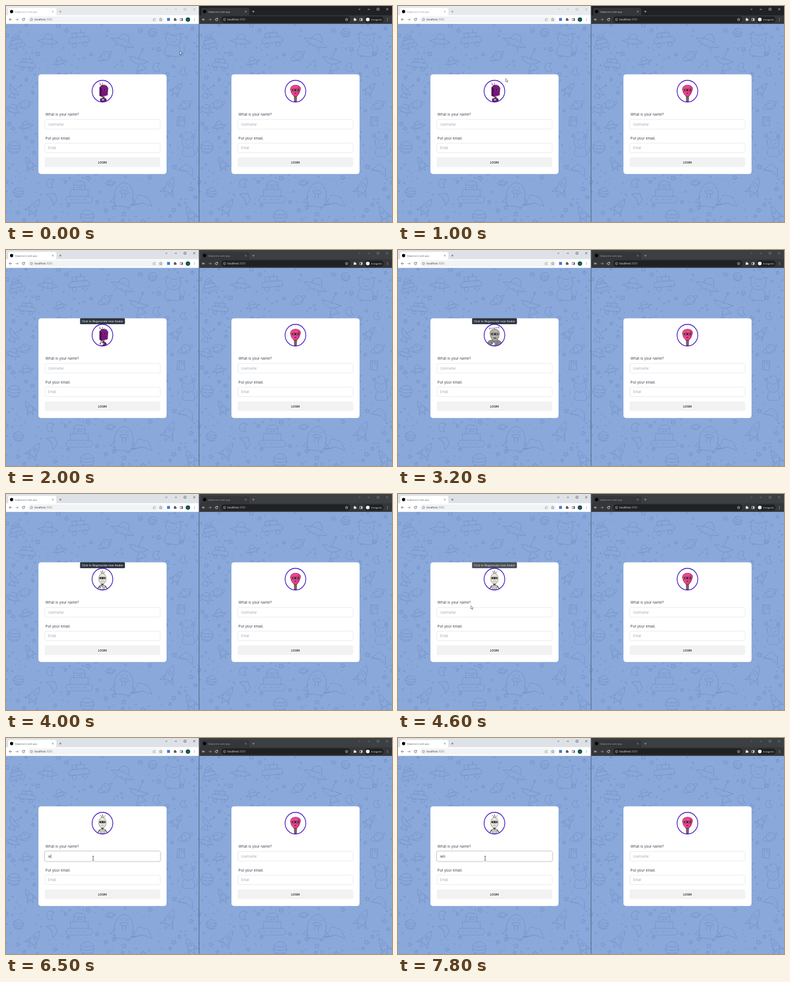
Animation of 690 by 388 pixels, one loop 8 s. Source, as an HTML page with a canvas:

```html
<!DOCTYPE html>
<html lang="en">
<head>
<meta charset="utf-8">
<title>Login</title>
<style>
html, body { margin: 0; width: 100%; height: 100%; overflow: hidden; background: #8aa9da; }
canvas { display: block; width: 690px; height: 388px; }
</style>
</head>
<body>
<canvas id="stage"></canvas>
<script>
const W = 690, H = 388, HALF = 345, LOOP = 8000;
const UI = '"Open Sans", "Noto Sans", sans-serif';
const PAGE = 'Inter, Roboto, sans-serif';
const APP = 'Gabplume web app';
const ratio = Math.max(1, window.devicePixelRatio || 1);

function makeCanvas(canvas, w, h) {
  canvas.width = w * ratio;
  canvas.height = h * ratio;
  const ctx = canvas.getContext('2d');
  ctx.scale(ratio, ratio);
  return ctx;
}
const c = makeCanvas(document.getElementById('stage'), W, H);

const clamp = v => Math.max(0, Math.min(1, v));
const ramp = (t, a, b) => clamp((t - a) / (b - a));
const ease = v => v * v * (3 - 2 * v);

function rect(x, y, w, h, r, fill, stroke, line = .5) {
  c.beginPath();
  c.roundRect(x, y, w, h, r);
  if (fill) { c.fillStyle = fill; c.fill(); }
  if (stroke) { c.strokeStyle = stroke; c.lineWidth = line; c.stroke(); }
}
function oval(x, y, rx, ry, fill, stroke, line = .5) {
  c.beginPath();
  c.ellipse(x, y, rx, ry, 0, 0, 7);
  if (fill) { c.fillStyle = fill; c.fill(); }
  if (stroke) { c.strokeStyle = stroke; c.lineWidth = line; c.stroke(); }
}
function shape(d, x, y, fill, stroke, line = .8) {
  c.save();
  c.translate(x, y);
  const p = new Path2D(d);
  if (fill) { c.fillStyle = fill; c.fill(p); }
  if (stroke) { c.strokeStyle = stroke; c.lineWidth = line; c.stroke(p); }
  c.restore();
}
function text(s, x, y, size, color, family = PAGE, weight = 400, align = 'left') {
  c.font = `${weight} ${size}px ${family}`;
  c.textAlign = align;
  c.fillStyle = color;
  c.fillText(s, x, y);
  return c.measureText(s).width;
}
function faded(alpha, fn) {
  c.save();
  c.globalAlpha = alpha;
  fn();
  c.restore();
}

// Wallpaper

const doodles = {
  ufo: 'M-18 2Q0-8 18 2Q0 12-18 2ZM-8-2Q-7-12 0-12Q7-12 8-2M-10 3h2M-1 5h2M8 3h2M-7 7l-3 6M7 7l3 6',
  saturn: 'M-9 0a9 9 0 1 0 18 0a9 9 0 1 0-18 0M-8-4C-24 4-14 10 0 5S22-9 8-5M-3-4h4',
  ball: 'M-11 0a11 11 0 1 0 22 0a11 11 0 1 0-22 0M-10-4Q0-1 10-4M-11 1Q0 5 11 1M-8 7Q0 10 8 7',
  rocket: 'M0-18Q8-8 6 8H-6Q-8-8 0-18ZM-6 1L-12 12L-5 9M6 1L12 12L5 9M-3-4a3 3 0 1 0 6 0a3 3 0 1 0-6 0M-3 9L0 17L3 9',
  cat: 'M-16-10L-14-22L-6-16H4L12-22L14-10Q16 4 0 5Q-16 4-16-10ZM-8-8h2M5-8h2M-3-3Q0 0 3-3M-12 4Q-20 24-10 26H12Q20 22 12 4M15 22Q28 16 22 4',
  dish: 'M-16-8Q-14 14 10 10ZM-4 2L8-12M8-14a2 2 0 1 0 .1 0M-6 10L-12 20H4L-1 11',
  rover: 'M-18 6H18V0Q18-4 12-4H-12Q-18-4-18 0ZM-12-4V-12H10V-4M-4-12V-4M4-12V-18M-14 10a4 4 0 1 0 8 0a4 4 0 1 0-8 0M5 10a4 4 0 1 0 8 0a4 4 0 1 0-8 0',
  tank: 'M-24 16a6 6 0 0 0 6 6H18a6 6 0 0 0 0-12H-18a6 6 0 0 0-6 6ZM-16 10V-2H16V10M-10-2V-14Q0-22 10-14V-2M-10-10H10M-16 16h4M-4 16h4M8 16h4M-5-6h10',
  walrus: 'M-14 24Q-22 0-10-14Q0-24 10-14Q22 0 14 24ZM-6-9h2M4-9h2M-8-2Q0-8 8-2Q4 4 0 0Q-4 4-8-2M-3 2V10M3 2V10M-15 8L-24 18L-13 20M15 8L24 18L13 20',
  book: 'M-8-10L8-12L10 8L-6 10ZM-4-11L-2 9M1-7l5-1M2-3l5-1',
  lines: 'M-18 8L-7-11L10-6L17 10L0 4ZM-18 8L0 4',
  moon: 'M4-9A10 10 0 1 0 9 6A9 9 0 0 1 4-9Z',
  star: 'M0-5L1.5-1.6 5-1.5 2.3.9 3.2 4.5 0 2.5-3.2 4.5-2.3.9-5-1.5-1.5-1.6Z'
};
// x, y, scale, turn
const places = {
  rover: [[131, 60, 1, -.1], [38, 105, .8, .1]],
  ufo: [[75, 62, 1, .1], [209, 64, 1.2, .4], [96, 100, .7, -.3], [12, 186, .8, .3], [36, 215, .7, -.2]],
  cat: [[299, 67, .9, .1], [326, 252, .7, 0]],
  dish: [[240, 93, 1.1, -.3], [18, 150, .8, .3]],
  saturn: [[178, 90, .9, -.3], [34, 177, .9, 0], [321, 178, .9, -.2], [187, 318, .6, .2]],
  ball: [[14, 254, 1, .1], [145, 378, 1.1, 0], [262, 48, .7, .4], [22, 335, .8, .2]],
  rocket: [[292, 326, 1.1, .4], [42, 284, .8, -.5], [50, 362, 1, .6], [305, 150, .8, .7], [330, 374, .9, -.5]],
  tank: [[131, 332, 1, 0], [18, 62, .6, -.2]],
  walrus: [[211, 336, 1, .1]],
  book: [[312, 208, .8, .2]],
  lines: [[244, 350, 1, 0], [324, 294, .8, .4], [84, 345, .7, 1]],
  moon: [[270, 110, .8, .2], [80, 318, .8, .5], [318, 118, .7, 0]]
};

const wall = document.createElement('canvas');
function paintWall() {
  const g = makeCanvas(wall, HALF, H);
  let seed = 11;
  const rnd = () => (seed = seed * 16807 % 2147483647) / 2147483647;
  g.fillStyle = '#8aa9da';
  g.fillRect(0, 0, HALF, H);
  g.strokeStyle = '#7391c9';
  g.lineJoin = g.lineCap = 'round';
  const stamp = (name, x, y, s, turn) => {
    g.save();
    g.translate(x, y);
    g.rotate(turn);
    g.scale(s, s);
    g.lineWidth = .85 / s;
    g.stroke(new Path2D(doodles[name]));
    g.restore();
  };
  const used = [];
  for (const name in places) for (const p of places[name]) {
    stamp(name, ...p);
    used.push([p[0], p[1], 21 * p[2]]);
  }
  for (let i = 0; i < 1400; i++) {
    const x = rnd() * HALF, y = 34 + rnd() * 354, kind = rnd();
    const r = kind < .45 ? 5 : 3;
    if (used.some(u => Math.hypot(u[0] - x, u[1] - y) < u[2] + r)) continue;
    used.push([x, y, r + 1]);
    if (kind < .45) stamp('star', x, y, .6 + rnd() * .35, rnd() * 2);
    else {
      g.lineWidth = .8;
      g.beginPath();
      g.arc(x, y, .5 + rnd() * 1.6, 0, kind < .8 ? 7 : 3);
      g.stroke();
    }
  }
}
paintWall();

// Browser frame

function tabBar(dark, active) {
  const [strip, tab, ink, ctl] = dark
    ? [active ? '#202124' : '#3c4043', '#35363a', active ? '#d6d8db' : '#a9acb0', active ? '#f1f3f4' : '#888b8f']
    : [active ? '#dee1e6' : '#e7eaed', '#fff', active ? '#4d5156' : '#85898e', active ? '#33363a' : '#a6a9ad'];
  c.fillStyle = strip;
  c.fillRect(0, 0, HALF, 17);
  rect(4, 3.5, 86, 16, 3, tab);
  oval(10, 10, 2.9, 2.9, '#000');
  text(APP, 16, 11.6, 4.35, ink, UI);
  shape('M-1.4-1.4L1.4 1.4M1.4-1.4L-1.4 1.4', 83.6, 10, null, ink, .6);
  shape('M-2 0H2M0-2V2', 97.2, 10, null, ink, .7);
  shape('M-1.6-.8L0 .8L1.6-.8', 286.7, 5.8, null, ctl, .7);
  shape('M-1.9 0H1.9', 303.6, 6, null, ctl, .7);
  rect(318.2, 4, 3.6, 3.6, .5, null, ctl, .7);
  shape('M-1.8-1.8L1.8 1.8M1.8-1.8L-1.8 1.8', 336.5, 5.8, null, ctl, .7);
}

function toolbar(dark) {
  const ink = dark ? '#e8eaed' : '#4d5156', soft = dark ? '#9aa0a6' : '#80868b';
  c.fillStyle = dark ? '#35363a' : '#fff';
  c.fillRect(0, 16.5, HALF, 16);
  shape('M2.3 0H-2.3M-.2-2.2L-2.4 0L-.2 2.2', 8.3, 24.3, null, ink);
  shape('M-2.3 0H2.3M.2-2.2L2.4 0L.2 2.2', 19.6, 24.3, null, soft);
  shape('M1.7-1.4A2.2 2.2 0 1 0 2.2.5M2.2-2.6V-.8H.4', 31.2, 24.3, null, ink);
  rect(39.5, 18.6, dark ? 231 : 243, 11.4, 5.7, dark ? '#202124' : '#f1f3f4');
  oval(45.6, 24.3, 2.1, 2.1, null, ink, .5);
  shape('M0-.3V1.2M0-1.2V-.8', 45.6, 24.3, null, ink, .5);
  const w = text('localhost', 51, 26, 4.75, dark ? '#e8eaed' : '#34373b', UI);
  text(':3000', 51 + w, 26, 4.75, soft, UI);
  const star = x => {
    c.save();
    c.translate(x, 24.3);
    c.scale(.52, .52);
    c.strokeStyle = ink;
    c.lineWidth = 1.1;
    c.stroke(new Path2D(doodles.star));
    c.restore();
  };
  const puzzle = x => shape('M-2-1.3H-.8A.9.9 0 1 1 .8-1.3H2V.2A.9.9 0 1 1 2 1.7V2.6H-2V1.4A.8.8 0 0 0-2 0Z', x, 24, ink);
  const panel = x => {
    rect(x - 2.2, 22.3, 4.4, 4, .4, null, ink, .7);
    c.fillStyle = ink;
    c.fillRect(x + .3, 22.3, 1.9, 4);
  };
  if (dark) {
    star(264);
    puzzle(278.4);
    panel(289.6);
    rect(296.2, 18.8, 34, 11, 5.5, '#202124');
    oval(301.7, 24.3, 3.3, 3.3, '#f1f3f4');
    text('Incognito', 308, 25.9, 4.35, '#f1f3f4', UI);
  } else {
    shape('M-.5-1.2H-2V2.2H1.8V.8M-.8.6Q-.6-1.4 1.8-1.4M1-2.5L2.2-1.4L1-.3', 265, 24.2, null, soft, .55);
    star(276.6);
    rect(287.9, 21.6, 5.2, 5.2, .5, '#3f78d8');
    puzzle(302);
    panel(313.6);
    oval(325.2, 24.3, 3.9, 3.9, '#0b4f48');
    text('s', 325.2, 25.5, 3.6, '#d7e6e3', UI, 400, 'center');
  }
  for (const y of [-1.8, 0, 1.8]) oval(337, 24.3 + y, .5, .5, ink);
}

// Avatars, drawn around their centre

const avatars = {
  purple() {
    shape('M-6-13L-1-10M0-15L1-10M5-13L2-10M-5-15L-3-12', 0, 0, null, '#77717a', 1);
    shape('M-5-7L-1-11L7-10L10-6L9 7L-1 10L-5 8Z', 0, 0, '#7f1a82', '#3d0d42', .6);
    shape('M-5-7L-1-5L-1 10L-5 8Z', 0, 0, '#54105a');
    rect(0, -4, 8, 3, 1, '#4c0d52');
    shape('M1 3H7M1 5H6', 0, 0, null, '#48104c', .6);
    oval(2, -2.5, .8, .8, '#d46bd2');
    oval(6, -2.5, .8, .8, '#d46bd2');
    rect(0, 10, 4, 3, 0, '#55505a');
    rect(-4, 13, 11, 6, 2, '#6b166e', '#2f0c33');
    rect(-1, 14, 4, 3, 1, '#b8a7bb');
  },
  grey() {
    shape('M-9-12L8-14M0-13V-9M-9-14V-10M8-16V-12', 0, 0, null, '#84817f', 1);
    shape('M-16 20L-10 10L-3 8H5L11 11L16 20Z', 0, 0, '#8e8b89', '#4d4b4a', .6);
    shape('M-8-4Q-7-11 1-11Q9-10 9-3Q8 7 3 10H-2Q-8 4-8-4Z', 0, 0, '#b2afad', '#575452', .7);
    rect(-6, -4, 13, 4, 1, '#4b4646');
    oval(-2, -2, 1.1, 1.1, '#d9d6d4');
    oval(4, -2, 1.1, 1.1, '#d9d6d4');
    rect(-2, 4, 6, 2.5, 1, '#65605e');
    shape('M-6 12L-2 19M6 11L3 19', 0, 0, null, '#55514f');
  },
  white() {
    shape('M-4-15L-1-10L0-16L2-10L5-14', 0, 0, null, '#8b8780', 1);
    oval(0, -1, 6.8, 9.5, '#e5e3df', '#6f6b67', .7);
    rect(-5.5, -4, 11, 4, 1.8, '#35322f');
    oval(-2, -2, 1.1, 1.1, '#e9cf75');
    oval(2.6, -2, 1.1, 1.1, '#e9cf75');
    shape('M-3 4H3', 0, 0, null, '#8e8984', .7);
    rect(-2, 8, 4, 3, 0, '#5b5753');
    shape('M-5 11H5L4 19H-4Z', 0, 0, '#c9c6c1', '#5a5651', .6);
    shape('M-5 12L-9 18M5 12L9 18', 0, 0, null, '#55514e', 1.4);
  },
  pink() {
    shape('M-9-4Q-8-11 1-11Q10-10 9-3Q7 5 3 9H-3Q-9 3-9-4Z', 0, 0, '#ec4390', '#7c2450', .7);
    shape('M5-9Q9-7 8-2Q6 4 3 8Q5 0 5-9Z', 0, 0, '#cf2f78');
    rect(-6, -4, 12, 4, 1, '#4c2634');
    oval(-3, -2, 1, 1, '#f3c4d8');
    oval(2.8, -2, 1, 1, '#f3c4d8');
    rect(-2, 3, 4, 2, .8, '#8c2859');
    shape('M-2.4 9H2.4L2 20H-2Z', 0, 0, '#75585d', '#4a363a', .5);
    shape('M-2 12H2M-2 15H2', 0, 0, null, '#a58a8e', .5);
  }
};

// Login page

function input(y, hint, value, focus) {
  if (focus) rect(68.4, y - 1.2, 208.2, 19.6, 3.6, '#fff', '#c3c7cd', .8);
  rect(69.3, y, 206.4, 17.2, 2.9, '#fff', focus ? '#c3c7cd' : '#d3d5da', .5);
  const base = y + 10.6;
  if (!value) text(hint, 75.2, base, 5.75, '#a3a7ae');
  return value ? text(value, 75.2, base, 5.75, '#343c49') : 0;
}

function page(avatar, value = '', focus = false, caret = false) {
  c.drawImage(wall, 0, 0, HALF, H);
  rect(58, 122.8, 229, 179, 4.5, '#fff');
  c.save();
  c.beginPath();
  c.ellipse(172.4, 153, 18.5, 19.5, 0, 0, 7);
  c.clip();
  c.translate(172.4, 153);
  avatars[avatar]();
  c.restore();
  oval(172.4, 153, 18.5, 19.5, null, '#4512c4', 1.3);
  text('What is your name?', 70.6, 197, 6.42, '#3b4350');
  text('Put your email.', 70.6, 239.5, 6.42, '#3b4350');
  const w = input(203.9, 'Username', value, focus);
  input(246.3, 'Email');
  rect(69.2, 272, 206.3, 17.3, 2.9, '#f2f2f2');
  text('LOGIN', 172.4, 282.5, 5.03, '#1f2937', PAGE, 600, 'center');
  if (caret) {
    c.fillStyle = '#1f2937';
    c.fillRect(75.2 + w, 208.6, .6, 7.4);
  }
}

function tooltip() {
  rect(132.4, 122.6, 80.2, 10.6, 1.5, '#2c333e');
  text('Click to Regenerate new Avatar', 172.4, 129.8, 5.03, '#f4f5f7', PAGE, 400, 'center');
}

// Pointer: time, x, y
const route = [
  [600, 310.5, 81], [1000, 192.5, 130], [1450, 170, 163], [4000, 170, 163],
  [4500, 130.3, 200.6], [4600, 130.3, 200.6], [4950, 150, 227], [5300, 155.8, 216]
];
function pointerAt(t) {
  let a = route[0];
  for (const b of route) {
    if (t < b[0]) {
      if (a === b) break;
      const k = ease(ramp(t, a[0], b[0]));
      return [a[1] + (b[1] - a[1]) * k, a[2] + (b[2] - a[2]) * k];
    }
    a = b;
  }
  return [a[1], a[2]];
}
function pointer(t) {
  const [x, y] = pointerAt(t);
  if (Math.hypot((x - 172.4) / 19, (y - 153) / 20) < 1) {
    shape('M-.7 0Q0-.8.7 0V3L3.4 3.8V6.4L2.6 8.6H-1.2L-3 5.4L-2.3 4.8L-.7 6Z', x, y, '#fff', '#222', .5);
  } else if (x > 69 && x < 276 && y > 204 && y < 221) {
    shape('M-1.3-3.6H1.3M0-3.6V3.6M-1.3 3.6H1.3', x, y, null, '#222', .7);
  } else {
    shape('M0 0V6L1.4 4.8L2.4 7L3.4 6.6L2.4 4.4H4.2Z', x, y, '#fff', '#222', .5);
  }
}

const keys = [[6500, 'w'], [6700, 'wi'], [7100, 'win'], [7300, 'winn'], [7700, 'win']];

function draw(t) {
  const swap = ramp(t, 1800, 2000);
  const avatar = t < 2800 ? 'purple' : t < 3500 ? 'grey' : 'white';
  const typed = keys.reduce((s, k) => t >= k[0] ? k[1] : s, '');
  const focus = t >= 5300;
  const caret = focus && (t < 5800 || t >= 6300 && t < 7800);
  const tip = ramp(t, 1200, 1400) * (1 - ramp(t, 4570, 4800));

  for (const dark of [false, true]) {
    c.save();
    c.translate(dark ? HALF : 0, 0);
    tabBar(dark, dark);
    if (swap) faded(swap, () => tabBar(dark, !dark));
    toolbar(dark);
    c.beginPath();
    c.rect(0, 32.3, HALF, H);
    c.clip();
    if (dark) page('pink');
    else page(avatar, typed, focus, caret);
    c.restore();
  }
  c.fillStyle = '#4c5b78';
  c.fillRect(344.6, 0, 1, H);
  if (tip) faded(tip, tooltip);
  pointer(t);
}

const start = performance.now();
function tick() {
  draw((performance.now() - start) % LOOP);
  requestAnimationFrame(tick);
}
tick();
</script>
</body>
</html>
```
